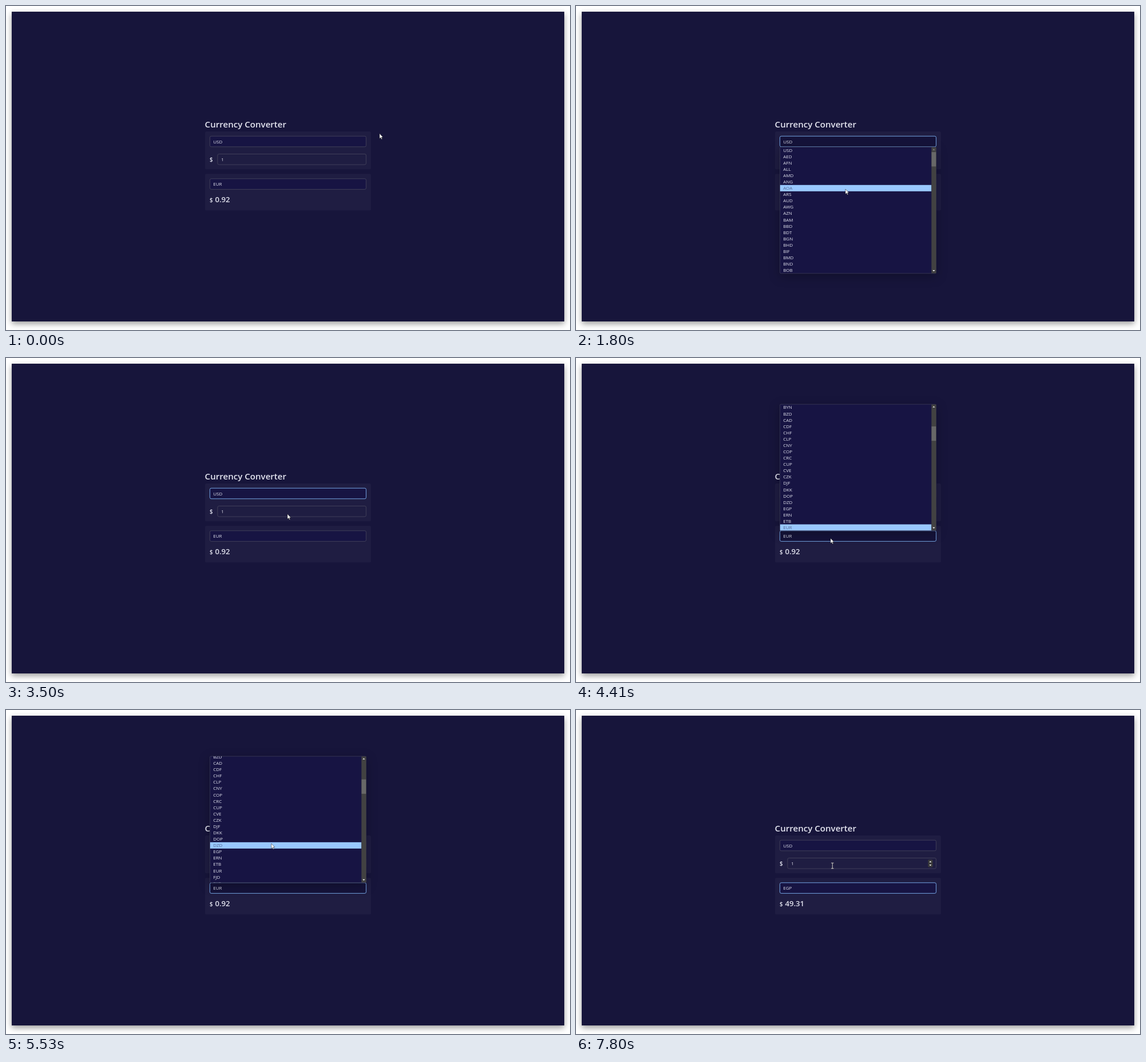
An HTML page for the animation above (8 s loop, 986 by 568 pixels).

```html
<!DOCTYPE html>
<html lang="en">
<head>
<meta charset="utf-8">
<title>Currency Converter</title>
<style>
  html, body { margin: 0; width: 100%; height: 100%; overflow: hidden; background: #fff; }
  #panel { position: absolute; left: 10px; top: 10px; width: 966px; height: 543px;
    background: #17153b; box-shadow: 0 4px 10px rgba(0, 0, 0, .4); }
  svg { position: absolute; left: 0; top: 0; display: block; }
  text { font: 8px "Open Sans", "Noto Sans", sans-serif; fill: #dfe0ec; }
  .title { font-size: 15.1px; font-weight: 600; fill: #e4e5f0; }
  .sign { font-size: 9.8px; font-weight: 600; }
  .result { font-size: 13.2px; font-weight: 600; }
  .card { fill: #1f1d42; }
  .field { fill: #171443; stroke: #45435c; stroke-width: .9; }
  .field.clear { fill: none; }
  .field.focus { stroke: #7fb4f5; }
  .field.open { fill: #15133a; }
  .row.hover { fill: #566a92; }
  #popup > .back { fill: #171443; stroke: #3d3b58; stroke-width: .8;
    filter: drop-shadow(0 5px 9px rgba(0, 0, 0, .28)); }
</style>
</head>
<body>
<div id="panel"></div>
<svg width="986" height="568" viewBox="0 0 986 568">
  <text class="title" x="347.6" y="212.6">Currency Converter</text>

  <rect class="card" x="348" y="220" width="290" height="66.3" rx="2.5"/>
  <rect class="field" id="from" x="356.4" y="228.2" width="273.2" height="18.6" rx="2.5"/>
  <text x="362.2" y="240.8">USD</text>
  <text class="sign" x="356" y="272.6">$</text>
  <rect class="field clear" x="369.9" y="259.5" width="259.7" height="18.6" rx="2.5"/>
  <text x="376.2" y="271.9">1</text>
  <g id="spinner">
    <rect x="615.5" y="262.5" width="8" height="13" rx="1" fill="#3b3b3b"/>
    <path d="M617.6 267l1.9-2.2 1.9 2.2zM617.6 271l1.9 2.2 1.9-2.2z" fill="#fff"/>
  </g>

  <rect class="card" x="348" y="294.3" width="290" height="64.3" rx="2.5"/>
  <rect class="field" id="to" x="356.4" y="302.8" width="273.2" height="18.6" rx="2.5"/>
  <text id="code" x="362.2" y="315.3"></text>
  <text class="sign" x="356" y="343.6">$</text>
  <text class="result" id="result" x="365.4" y="343.7"></text>

  <g id="popup">
    <rect class="back" x=".4" y="0" width="273.2" height="221.5" rx="2"/>
    <svg x="0" y="0" width="274" height="221.5">
      <g id="rows"><rect id="bar" x=".8" width="264.7" fill="#99c8ff"/></g>
    </svg>
    <rect x="265.4" y=".3" width="8.2" height="220.9" fill="#424242"/>
    <rect id="thumb" x="265.6" width="7.8" height="25.2" fill="#686868"/>
    <path id="up" d="M267.4 5.5l2.1-2.2 2.1 2.2z"/>
    <path d="M267.4 215.7l2.1 2.2 2.1-2.2z" fill="#fff"/>
  </g>

  <path id="arrow" d="M0 0V8.8L2 7l1.4 3.1 1.4-.6L3.4 6.5H6.1z" fill="#fff" stroke="#111" stroke-width=".5"/>
  <path id="beam" d="M-2.2-4.8H2.2M0-4.8V4.8M-2.2 4.8H2.2" fill="none" stroke="#e6e2d2" stroke-width=".9"/>
</svg>
<script>
const LOOP = 8000, ROW = 11.08, VISIBLE = 20;
const codes = ('USD AED AFN ALL AMD ANG AOA ARS AUD AWG AZN BAM BBD BDT BGN BHD BIF BMD BND BOB BRL BSD BTN BWP ' +
  'BYN BZD CAD CDF CHF CLP CNY COP CRC CUP CVE CZK DJF DKK DOP DZD EGP ERN ETB EUR FJD FKP FOK GBP').split(' ');

// Pointer moves: first step, last step, step count, destination x, y.
const start = [653, 223.6];
const moves = [
  [260, 560, 4, 506, 243.5],
  [1490, 1800, 4, 471, 321],
  [1900, 2290, 5, 497, 293],
  [2590, 2700, 2, 508, 262],
  [2900, 3200, 4, 506, 251],
  [3400, 3700, 4, 478, 296],
  [3800, 4100, 4, 445, 316],
  [4510, 4610, 2, 447, 346],
  [4710, 5020, 4, 468, 234],
  [5320, 5720, 5, 461, 234],
  [6620, 7120, 6, 416, 249],
  [7220, 7420, 3, 410, 273],
  [7520, 7800, 4, 448.3, 273]
];
const lists = [
  { open: 870, close: 3300, top: 247.3, first: 0 },
  { open: 4200, close: 6420, top: 81.1, first: 24 }
];

const $ = id => document.getElementById(id);
const clamp = (v, lo, hi) => Math.min(hi, Math.max(lo, v));
const show = (id, on) => $(id).setAttribute('visibility', on ? 'visible' : 'hidden');
const place = (id, x, y) => $(id).setAttribute('transform', `translate(${x} ${y})`);

const rows = codes.map((code, i) => {
  const row = document.createElementNS('http://www.w3.org/2000/svg', 'text');
  row.textContent = code;
  row.setAttribute('class', 'row');
  row.setAttribute('x', 6.2);
  row.setAttribute('y', i * ROW + 8.4);
  $('rows').append(row);
  return row;
});
$('bar').setAttribute('height', ROW);

// Share of a stepped change that is done at time t.
const stepped = (t, from, to, count) =>
  t < from ? 0 : Math.min(count, Math.floor((t - from) * (count - 1) / (to - from) + 1e-6) + 1) / count;

function pointer(t) {
  let [x, y] = start;
  for (const [from, to, count, endX, endY] of moves) {
    const p = stepped(t, from, to, count);
    x += (endX - x) * p;
    y += (endY - y) * p;
  }
  return [x, y];
}

function drawPopup(t, y) {
  const list = lists.find(l => t >= l.open && t < l.close);
  show('popup', list);
  if (!list) return;
  const extra = 25.8 * stepped(t, 5320, 5720, 5);
  const scroll = list.first * ROW + extra;
  const inView = clamp(y - list.top, 0, VISIBLE * ROW - 1);
  const hovered = Math.floor((inView + scroll) / ROW);
  place('popup', 356, list.top);
  $('popup').setAttribute('opacity', stepped(t, list.open, list.open + 100, 2));
  place('rows', 0, -scroll);
  $('bar').setAttribute('y', hovered * ROW);
  $('thumb').setAttribute('y', 8.8 + scroll * .113);
  $('up').setAttribute('fill', scroll ? '#fff' : '#858585');
  rows.forEach((row, i) => row.classList.toggle('hover', i === hovered));
}

function drawField(id, focus, open) {
  $(id).classList.toggle('focus', focus);
  $(id).classList.toggle('open', open);
}

function render(t) {
  const [x, y] = pointer(t);
  const [a, b] = lists;
  const inInput = x > 370 && x < 630 && y > 259 && y < 278 && t > b.close;
  drawField('from', t >= a.open && t < b.open, t >= a.open && t < a.close);
  drawField('to', t >= b.open, t >= b.open && t < b.close);
  $('code').textContent = t < 5720 ? 'EUR' : 'EGP';
  $('result').textContent = t < 6520 ? '0.92' : '49.31';
  drawPopup(t, y);
  show('spinner', inInput);
  show('arrow', !inInput);
  show('beam', inInput);
  place('arrow', x, y);
  place('beam', x, y);
}

const began = performance.now();
function tick() {
  render((performance.now() - began) % LOOP);
  requestAnimationFrame(tick);
}
tick();
</script>
</body>
</html>
```
